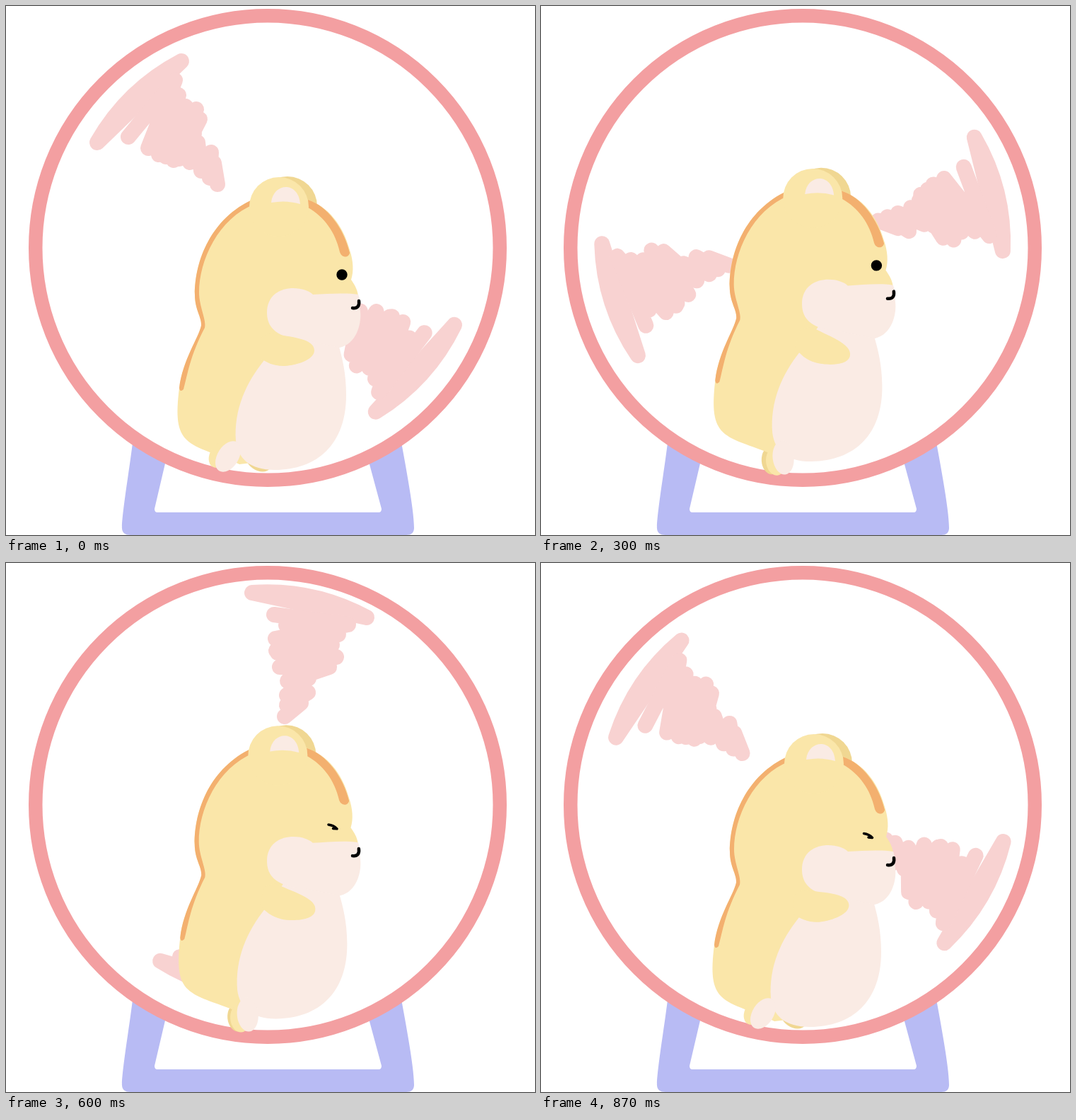
Recreate the animation shown at these times as an HTML page with a canvas. Size 748x748 px, loop 0.9 s.

```html
<!DOCTYPE html>
<html lang="en">
<head>
<meta charset="utf-8">
<title>Hamster wheel</title>
<style>
html, body { margin: 0; width: 100%; height: 100%; overflow: hidden; background: #fff; }
canvas { display: block; width: 748px; height: 748px; }
</style>
</head>
<body>
<canvas id="stage" width="748" height="748"></canvas>
<script>
const ctx = document.getElementById('stage').getContext('2d');
const STEP = 30, STEPS = 30;
const RAD = Math.PI / 180;

const color = {
  ring: '#f39fa1', stand: '#b8bbf4', scribble: '#f8d2d1',
  fur: '#fae6a9', furDark: '#f0d792', stripe: '#f3b06f',
  skin: '#faebe4', skinDark: '#f9e3dc'
};

const shape = {
  stand: new Path2D('M181 600 C178 635 164 715 164 738 Q164 748 176 748 H566 Q577 748 577 738 C577 710 563 640 556 600 H501 L531 711 Q531 716 527 716 H214 Q210 716 210 711 L236 600Z'),
  body: new Path2D('M350 273 C290 300 267 360 267 408 C267 430 277 440 276 452 C272 470 250 500 245 540 C240 580 242 600 255 613 C270 628 300 633 330 648 L400 640 L470 470 L498 410 C497 400 492 393 488 387 C492 375 491 360 486 345 C476 308 455 284 427 274 C400 262 370 264 350 273Z'),
  back: new Path2D('M350 273 C290 300 267 360 267 408 C267 430 277 440 276 452 C272 470 250 500 245 540 Q246 547 251 542 C257 520 260 495 281 455 C284 445 273 425 273 405 C273 360 300 300 352 280Z'),
  brow: new Path2D('M427 274 C455 283 478 315 486 349 C485 356 475 357 472 348 C466 320 450 298 427 285Z'),
  innerEar: new Path2D('M375 278 C378 249 414 248 416 280 Q396 274 375 278Z'),
  belly: new Path2D('M365 501 C340 532 322 570 325 615 C328 640 345 656 380 656 C440 656 481 620 481 550 C481 520 476 500 470 478 L430 450 L392 465Z'),
  muzzle: new Path2D('M434 408 C420 394 369 392 369 434 C369 462 395 470 420 472 L472 483 C495 478 503 450 501 432 C500 420 500 412 498 408 C480 405 455 407 434 408Z'),
  arm: new Path2D('M358 470 L372 462 C395 468 436 468 436 487 C436 502 405 509 392 509 C378 509 368 504 358 497Z'),
  mouth: new Path2D('M499 417 C500 424 497 428 490 427'),
  closedEye: new Path2D('M456.5 382.5 Q464 383.5 468.5 388.5 L463 388')
};

const scribbles = [
  {
    turn: 0,
    streak: new Path2D('M129 193 Q172 118 248 78Z'),
    zigzag: new Path2D('M173 185 L239 105 L201 201 L244 126 L216 210 L254 142 L226 213 L269 146 L237 218 L274 160 L245 216 L266 180 L260 221 L271 193 L276 233 L290 207 L288 243 L294 222 L299 252')
  },
  {
    turn: -240,
    streak: new Path2D('M348 42 Q434 36 510 77Z'),
    zigzag: new Path2D('M379 73 L484 87 L396 88 L484 87 L381 107 L470 101 L382 124 L461 116 L384 127 L467 133 L387 147 L457 147 L398 167 L428 163 L397 187 L427 183 L397 201 L417 198 L394 217')
  }
];

function fill(path, style) {
  ctx.fillStyle = style;
  ctx.fill(path);
}

function ellipse(x, y, rx, ry, style) {
  ctx.fillStyle = style;
  ctx.beginPath();
  ctx.ellipse(x, y, rx, ry, 0, 0, 2 * Math.PI);
  ctx.fill();
}

function rotated(x, y, degrees, draw) {
  ctx.save();
  ctx.translate(x, y);
  ctx.rotate(degrees * RAD);
  ctx.translate(-x, -y);
  draw();
  ctx.restore();
}

function drawScribble({ turn, streak, zigzag }, angle) {
  rotated(373, 329, angle + turn, () => {
    ctx.strokeStyle = color.scribble;
    ctx.lineWidth = 22;
    fill(streak, color.scribble);
    ctx.stroke(streak);
    ctx.stroke(zigzag);
  });
}

function drawWheel(angle) {
  fill(shape.stand, color.stand);
  ellipse(370, 342, 328, 328, '#fff');
  ctx.strokeStyle = color.ring;
  ctx.lineWidth = 19.5;
  ctx.beginPath();
  ctx.arc(370, 342, 328.25, 0, 2 * Math.PI);
  ctx.stroke();
  for (const scribble of scribbles) drawScribble(scribble, angle);
}

function drawFoot(x, y, degrees, fur, skin) {
  rotated(x, y, degrees, () => {
    ellipse(x - 11, y + 4, 14, 20, fur);
    ellipse(x, y, 15, 24, skin);
  });
}

function drawFace(eyeOpen) {
  ctx.strokeStyle = '#000';
  ctx.lineWidth = 4.5;
  ctx.stroke(shape.mouth);
  if (eyeOpen) {
    ellipse(475, 380, 7.7, 7.7, '#000');
  } else {
    ctx.lineWidth = 3.5;
    ctx.stroke(shape.closedEye);
  }
}

function drawHamster(step) {
  // 0 is the crouched pose, 1 the raised one
  const lift = Math.min(step / 14, 1, (29 - step) / 13);
  const armAngle = 0.92 * Math.min(1.85 * step, 55 - 2 * step);
  const far = Math.pow(lift, 1.6);

  drawFoot(360 - 40 * far, 631 + 8 * Math.sqrt(lift), -55 + 90 * far, color.furDark, color.skinDark);

  ctx.save();
  ctx.translate(0, -16.6 * lift);
  rotated(370, 430, -0.95 * lift, () => {
    ellipse(398, 283, 42, 42, color.furDark);
    fill(shape.body, color.fur);
    fill(shape.back, color.stripe);
    fill(shape.brow, color.stripe);
    ellipse(386, 284, 42, 42, color.fur);
    fill(shape.innerEar, color.skin);
    fill(shape.belly, color.skin);
    fill(shape.muzzle, color.skin);
    rotated(365, 497, armAngle, () => fill(shape.arm, color.fur));
    drawFace(step < 15);
  });
  ctx.restore();

  drawFoot(314 + 40 * lift, 637 + 2 * Math.sin(Math.PI * lift), 32 - 54 * lift, color.fur, color.skin);
}

function render(time) {
  const step = Math.floor(time / STEP) % STEPS;
  ctx.fillStyle = '#fff';
  ctx.fillRect(0, 0, 748, 748);
  ctx.lineCap = ctx.lineJoin = 'round';
  drawWheel(step * 360 / STEPS);
  drawHamster(step);
}

let start;
function tick(now) {
  start ??= now;
  render(now - start);
  requestAnimationFrame(tick);
}
render(0);
requestAnimationFrame(tick);
</script>
</body>
</html>
```
